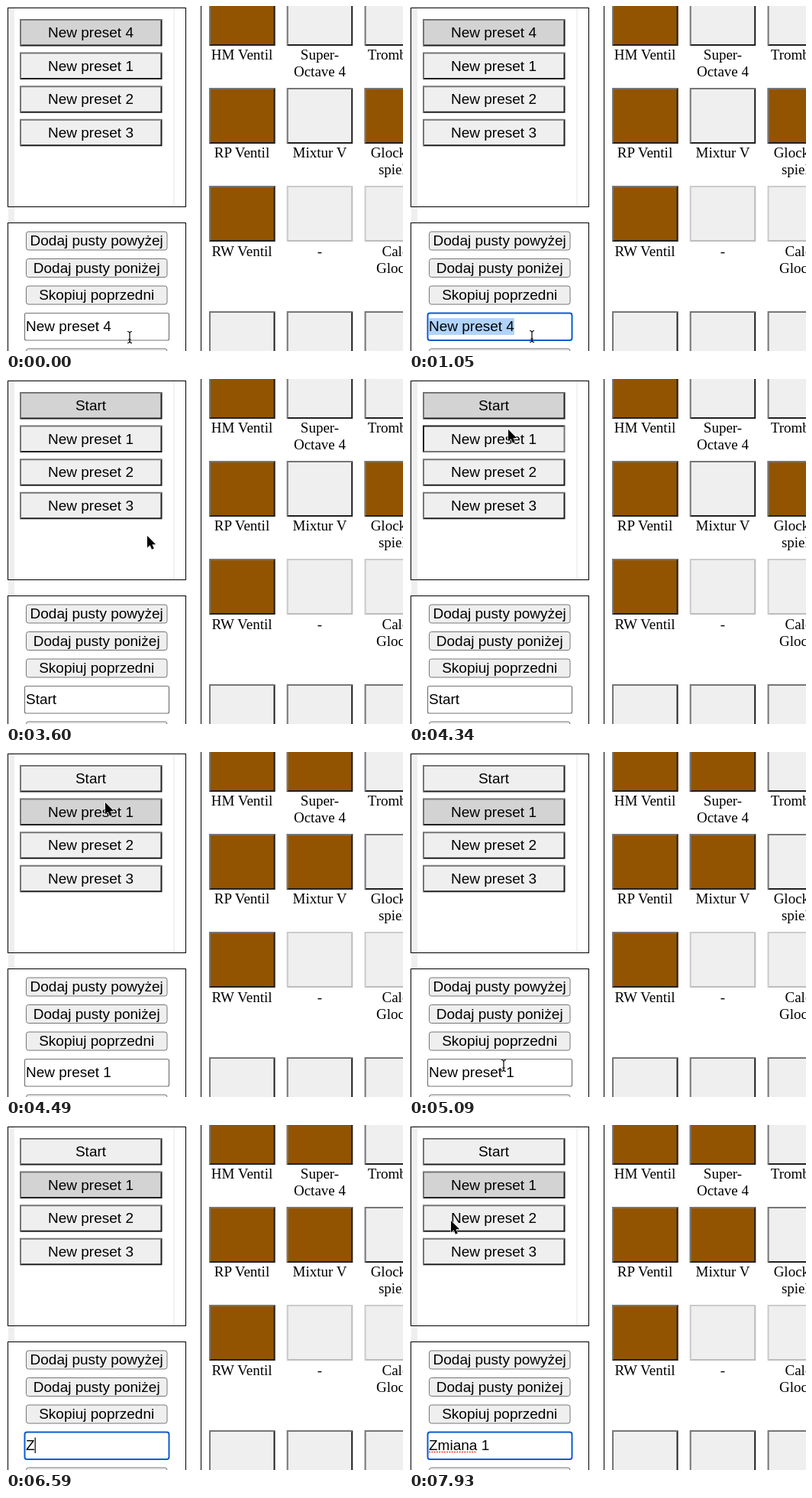
These frames come from a looping animation (520x451 px, 8 s). An HTML page:

```html
<!DOCTYPE html>
<html lang="pl">
<head>
<meta charset="utf-8">
<title>Presets</title>
<style>
html, body { margin: 0; width: 100%; height: 100%; overflow: hidden; background: #fff; }
svg { display: block; width: 520px; height: 451px; }
text { white-space: pre; fill: #000; }
.ui { font: 19px "Liberation Sans", Arial, sans-serif; }
.label { font: 19px "Liberation Serif", "Times New Roman", serif; }
.mid { text-anchor: middle; }
</style>
</head>
<body>
<svg id="stage" viewBox="0 0 520 451"></svg>
<script>
const LOOP = 8000, TICK = 150;
const GREY = '#efefef', PICKED = '#d3d3d3', BROWN = '#925400';
const EDGE = '#767676', DARK = '#212121', BLUE = '#0a5ccf';
const stage = document.getElementById('stage');

function add(tag, attrs, parent = stage) {
  const el = document.createElementNS('http://www.w3.org/2000/svg', tag);
  set(el, attrs);
  return parent.appendChild(el);
}
function set(el, attrs) {
  for (const key in attrs) el.setAttribute(key, attrs[key]);
}
function show(el, on) {
  el.style.display = on ? '' : 'none';
}
function text(str, x, y, cls) {
  const el = add('text', { x, y, class: cls });
  el.textContent = str;
  return el;
}
function rect(x, y, width, height, attrs) {
  return add('rect', { x, y, width, height, ...attrs });
}

// Rectangle with a two-tone 2px outset border
function bevel(x, y, w, h, fill, light = EDGE, dark = DARK) {
  const body = rect(x, y, w, h, { fill });
  const low = add('path', { d: `M${x + w} ${y}v${h}h${-w}l2-2h${w - 4}v${4 - h}z`, fill: dark });
  const high = add('path', { d: `M${x} ${y + h}v${-h}h${w}l-2 2h${4 - w}v${h - 4}z`, fill: light });
  return {
    fill: color => set(body, { fill: color }),
    press: on => {
      set(high, { fill: on ? dark : light });
      set(low, { fill: on ? light : dark });
    }
  };
}

// Preset list
rect(3, 3, 8, 280, { fill: '#f0eff0' });
rect(219.5, 3, 1, 259, { fill: '#e6e6e6' });
rect(2.5, 2.5, 233, 260, { fill: 'none', stroke: '#000' });
const presets = [4, 1, 2, 3].map((num, i) => {
  const y = 17 + i * 43.6;
  const box = bevel(18, y, 186.5, 35.5, GREY);
  return { box, label: text('New preset ' + num, 111, y + 24.2, 'ui mid') };
});

// Editor panel
rect(2.5, 283.5, 233, 200, { fill: '#fff', stroke: '#000' });
['Dodaj pusty powyżej', 'Dodaj pusty poniżej', 'Skopiuj poprzedni', ''].forEach((str, i) => {
  const y = i < 3 ? 295 + i * 35.5 : 448;
  rect(26.5, y, 184.5, 24, { rx: 3, fill: GREY, stroke: EDGE });
  text(str, 118.7, y + 18.3, 'ui mid');
});
const field = rect(24.5, 401.5, 189, 35.5, { rx: 2, fill: '#fff' });
const mark = rect(26, 408, 0, 22, { fill: '#b1d4fc' });
const value = text('', 26, 425, 'ui');
const spell = add('path', {
  d: 'M27 427.5H89', stroke: '#f0463c', 'stroke-width': 2.2,
  'stroke-linecap': 'round', 'stroke-dasharray': '0 3.3'
});
const caret = rect(0, 408.5, 1.2, 20.5, { fill: '#000' });

// Organ stops
rect(255, 0, 1, 451, { fill: '#000' });
const colX = [266, 367.7, 469.6], rowY = [-21, 107, 235, 399];
const tiles = rowY.map((y, r) => colX.map((x, c) =>
  r === 2 && c ? bevel(x, y, 86.5, 73, GREY, '#cbcbcb', '#bcbcbc')
               : bevel(x, y, 86.5, 73, c || r === 3 ? GREY : BROWN)));
[
  ['HM Ventil', 309, 70], ['RP Ventil', 309, 198], ['RW Ventil', 309, 326.5],
  ['Super-', 411, 70], ['Octave 4', 411, 92], ['Mixtur V', 411, 198], ['-', 411, 326.5],
  ['Trombone', 513, 70], ['Glocken-', 513, 198], ['spiel 8', 513, 220]
].forEach(([str, x, y]) => text(str, x, y, 'label mid'));
text('Calc.', 492.5, 326.5, 'label');
text('Glock.', 485, 348.5, 'label');

// Pointers
const arrow = add('path', {
  d: 'M0 0V15.5L3.6 12.2 6 17.8 8.8 16.6 6.4 11.2H11.2Z',
  fill: '#000', stroke: '#fff', 'stroke-width': 1.2, 'paint-order': 'stroke'
});
const beam = add('path', {
  d: 'M-3-7.5Q0-7.5 0-5Q0-7.5 3-7.5M0-5.5V5.5M-3 7.5Q0 7.5 0 5Q0 7.5 3 7.5M-1.8 3H1.8',
  fill: 'none', stroke: '#000', 'stroke-width': 1.2
});

// Pointer trips: [tick, x, y]; hidden between trips
const trips = [
  [[0, 162, 433], [6, 162, 433], [7, 161, 432], [10, 161, 432]],
  [[17, 121, -14], [20, 160, 120], [23, 185, 205], [25, 185, 205], [29, 130, 66], [30, 130, 66],
   [31, 131, 134], [32, 129, 260], [33, 126, 370], [34, 124, 410], [38, 124, 410],
   [39, 110, 424], [41, 60, 456]],
  [[51, -4, 366], [53, 55, 125]]
];
function pointerAt(n) {
  const trip = trips.find(p => n >= p[0][0] && n <= p[p.length - 1][0]);
  if (!trip) return null;
  const i = Math.max(1, trip.findIndex(p => p[0] >= n));
  const [a, ax, ay] = trip[i - 1], [b, bx, by] = trip[i];
  const k = (n - a) / (b - a);
  return [ax + (bx - ax) * k, ay + (by - ay) * k];
}

const within = (n, a, b) => n >= a && n <= b;

function fieldText(n) {
  if (n < 11) return 'New preset 4';
  if (n < 30) return 'Start'.slice(0, n - 10);
  if (n < 44) return 'New preset 1';
  return 'Zmiana 1'.slice(0, n - 43);
}
function selection(n) {
  if (n === 2) return [11, 12];
  if (n === 36) return [4, 10];
  return within(n, 3, 10) || within(n, 37, 43) ? [0, 12] : [0, 0];
}

function draw(n) {
  const switched = n >= 30;
  presets[0].label.textContent = n < 24 ? 'New preset 4' : 'Start';
  presets[0].box.fill(switched ? GREY : PICKED);
  presets[1].box.fill(switched ? PICKED : GREY);
  presets[1].box.press(n === 29);
  tiles[0][1].fill(switched ? BROWN : GREY);
  tiles[1][1].fill(switched ? BROWN : GREY);
  tiles[1][2].fill(switched ? GREY : BROWN);

  const focused = within(n, 1, 23) || n >= 35;
  set(field, { stroke: focused ? BLUE : EDGE, 'stroke-width': focused ? 2 : 1.2, rx: focused ? 3 : 2 });
  const str = fieldText(n);
  value.textContent = str;
  const width = len => len ? value.getSubStringLength(0, len) : 0;
  const [from, to] = selection(n);
  set(mark, { x: 26 + width(from), width: width(to) - width(from) });
  show(spell, n >= 50);
  show(caret, n === 1 || n === 35 || within(n, 11, 18) || within(n, 22, 23) || within(n, 44, 52));
  set(caret, { x: 26 + width(str.length) });

  const pos = pointerAt(n);
  const inField = pos && within(pos[0], 24, 214) && within(pos[1], 401, 438);
  show(arrow, pos && !inField);
  show(beam, inField);
  if (pos) set(inField ? beam : arrow, { transform: `translate(${pos})` });
}

// The screen refreshes every 150 ms, with two slightly short ticks
function tickAt(ms) {
  const slip = ms >= 7630 ? 20 : ms >= 4340 ? 10 : 0;
  return Math.min(53, Math.floor((ms + slip) / TICK));
}

const start = performance.now();
let last = -1;
function frame() {
  const n = tickAt((performance.now() - start) % LOOP);
  if (n !== last) draw(last = n);
  requestAnimationFrame(frame);
}
frame();
</script>
</body>
</html>
```
